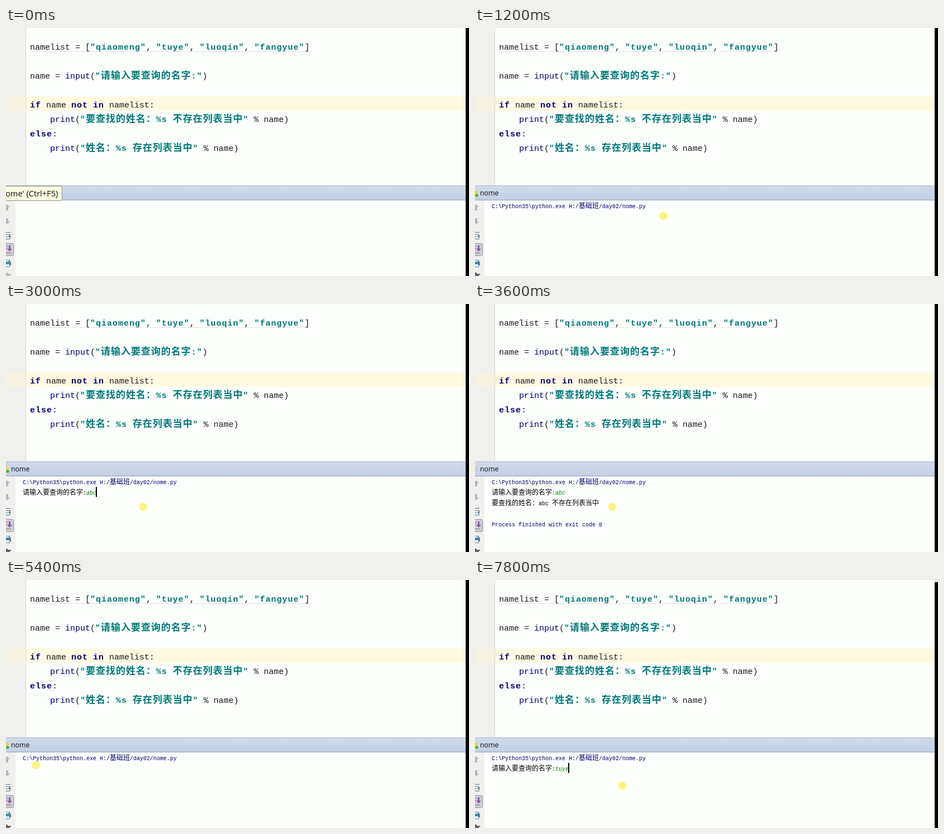
These frames come from a looping animation (830x446 px, 8000 ms). An HTML page:

```html
<!DOCTYPE html>
<html lang="zh-CN">
<head>
<meta charset="utf-8">
<title>Console run</title>
<style>
  html, body { margin: 0; width: 100%; height: 100%; overflow: hidden; background: #fcfefb; }
  svg { display: block; }
  text { white-space: pre; }
  .code text { font: 15px "Liberation Mono", monospace; fill: #1a1a1a; }
  .code .key, .code .str { font-weight: 700; letter-spacing: 1px; }
  .code .key, .code .builtin { fill: #000078; }
  .str { fill: #007a78; }
  .code .han { font: 700 17px "Noto Sans CJK SC", "Noto Sans CJK", "Noto Sans CJK JP", sans-serif; letter-spacing: 1px; }
  .console text { font: 10px "Liberation Mono", monospace; fill: #000; }
  .console .system { fill: #000070; }
  .console .han { font: 12px "Noto Sans CJK SC", "Noto Sans CJK", "Noto Sans CJK JP", sans-serif; }
  .console .typed { font-style: italic; fill: #007f00; }
  .label { font-family: "Open Sans", "Noto Sans", sans-serif; fill: #111; }
  #pointer { mix-blend-mode: multiply; }
</style>
</head>
<body>
<svg width="830" height="446" viewBox="0 0 830 446">
  <defs>
    <linearGradient id="bar" x2="0" y2="1">
      <stop stop-color="#d0daea"/>
      <stop offset="1" stop-color="#c3cfe3"/>
    </linearGradient>
  </defs>

  <!-- editor -->
  <rect width="830" height="446" fill="#fcfefb"/>
  <rect width="36" height="284" fill="#f0f0ee"/>
  <rect y="123" width="824" height="26" fill="#fff9e2"/>
  <rect y="123" width="36" height="26" fill="#f7f2e2"/>
  <rect x="35" width="1" height="284" fill="#d6d6ce"/>
  <path d="M43 42.5H543" stroke="#e2e4e2"/>
  <g class="code">
    <text x="43" y="39">namelist = [<tspan class="str">"qiaomeng"</tspan>, <tspan class="str">"tuye"</tspan>, <tspan class="str">"luoqin"</tspan>, <tspan class="str">"fangyue"</tspan>]</text>
    <text x="43" y="91">name = <tspan class="builtin">input</tspan>(<tspan class="str">"<tspan class="han">请输入要查询的名字</tspan>:"</tspan>)</text>
    <text x="43" y="143"><tspan class="key">if</tspan> name <tspan class="key">not</tspan> <tspan class="key">in</tspan> namelist:</text>
    <text x="43" y="169">    <tspan class="builtin">print</tspan>(<tspan class="str">"<tspan class="han">要查找的姓名：</tspan>%s <tspan class="han">不存在列表当中</tspan>"</tspan> % name)</text>
    <text x="43" y="195"><tspan class="key">else</tspan>:</text>
    <text x="43" y="221">    <tspan class="builtin">print</tspan>(<tspan class="str">"<tspan class="han">姓名：</tspan>%s <tspan class="han">存在列表当中</tspan>"</tspan> % name)</text>
  </g>

  <!-- tool window header -->
  <rect y="283" width="824" height="27" fill="url(#bar)"/>
  <path d="M0 283.5H824" stroke="#b4bcc8"/>
  <path d="M0 309.5H824" stroke="#98a2b2"/>
  <circle id="fileIcon" cx="-1" cy="296" r="5" fill="#f2cf3a"/>
  <circle id="runDot" cx="3" cy="301" r="2.5" fill="#35b62c"/>
  <text class="label" x="9" y="301" font-size="12.3">nome</text>

  <!-- console toolbar -->
  <rect y="310" width="17" height="136" fill="#f0f0ee"/>
  <g fill="#b4b8c2">
    <path d="M2 317L7 322H4V328H0V322H-3Z"/>
    <path d="M2 353L7 348H4V342H0V348H-3Z"/>
  </g>
  <path d="M0 367.5H8M0 371.5H7V375M0 375.5H3M0 379.5H8" fill="none" stroke="#5d7684" stroke-width="1.2"/>
  <path d="M4 375L8 372V378Z" fill="#3a7f9c"/>
  <rect x="-4" y="387.5" width="17.5" height="22" rx="2" fill="#cfccd4" stroke="#98969c"/>
  <path d="M0 392.5H3M0 396.5H2M0 404.5H9" stroke="#77727c" stroke-width="1.2"/>
  <path d="M5 391H8V397H11L6.5 402L2 397H5Z" fill="#8a5ca8"/>
  <path d="M0 417H7V420H9V427H7V430H0Z" fill="#5286a2"/>
  <path d="M0 419H5M0 426H5V428H0" fill="none" stroke="#f8fafa" stroke-width="2"/>
  <path id="trash" d="M0 440H3V442H9V444H7V446H0Z"/>

  <!-- console -->
  <g class="console">
    <text id="command" class="system" x="30" y="324">C:\Python35\python.exe H:/<tspan class="han">基础班</tspan>/day02/nome.py</text>
    <text id="prompt" x="30" y="343"><tspan class="han">请输入要查询的名字</tspan>:<tspan id="typed" class="typed"></tspan></text>
    <g id="result">
      <text x="30" y="362"><tspan class="han">要查找的姓名：</tspan>abc <tspan class="han">不存在列表当中</tspan></text>
      <text class="system" x="30" y="400">Process finished with exit code 0</text>
    </g>
    <rect id="caret" y="329" width="2" height="18"/>
  </g>

  <g id="tooltip">
    <rect x="-4" y="284.5" width="104.5" height="26" rx="2" fill="#fdfde0" stroke="#8c8c88"/>
    <text class="label" x="-1" y="303" font-size="14.6">ome' (Ctrl+F5)</text>
  </g>

  <circle id="pointer" r="7.2" fill="#fff47c"/>
  <rect x="824" width="6" height="446"/>
  <rect id="corner" x="824" width="6" height="4" fill="#eadbe2"/>
</svg>
<script>
  const LOOP = 8000, STEP = 200;
  const el = id => document.getElementById(id);
  const show = (id, on) => { el(id).style.visibility = on ? 'visible' : 'hidden'; };

  const runs = [
    { clear: 0, command: 1000, prompt: 1400, focus: 1800, input: 'abc', keys: [2200, 2400, 2600], done: 3400 },
    { clear: 5000, command: 5400, prompt: 5600, focus: 5800, input: 'tuye', keys: [6600, 6800, 7200, 7400], done: Infinity }
  ];

  // time, x, y
  const path = [
    [0, -40, 300], [600, -40, 300], [1200, 338, 338], [1800, 246, 365],
    [3800, 246, 365], [4600, 121, 396], [5000, -20, 320],
    [5200, -20, 320], [5800, 264, 370], [LOOP, 264, 370]
  ];

  function pointerAt(t) {
    const i = path.findIndex(p => p[0] > t);
    const [t0, x0, y0] = path[i - 1], [t1, x1, y1] = path[i];
    const k = (t - t0) / (t1 - t0), e = k * k * (3 - 2 * k);
    return [x0 + (x1 - x0) * e, y0 + (y1 - y0) * e];
  }

  function draw(now) {
    const t = Math.floor(now % LOOP / STEP) * STEP;
    const run = runs[t < runs[1].clear ? 0 : 1];
    const typed = run.input.slice(0, run.keys.filter(k => k <= t).length);
    const running = t < run.done;

    show('tooltip', t < 800);
    show('command', t >= run.command);
    show('prompt', t >= run.prompt);
    show('result', !running);
    show('caret', t >= run.focus && running);
    show('runDot', running);
    show('corner', t >= 7400);
    el('typed').textContent = typed;
    el('caret').setAttribute('x', 143 + 6 * typed.length);
    el('fileIcon').setAttribute('opacity', running ? 1 : 0.35);
    el('trash').setAttribute('fill', t >= run.command ? '#5e6470' : '#bcbec4');

    const [x, y] = pointerAt(t);
    el('pointer').setAttribute('cx', x);
    el('pointer').setAttribute('cy', y);
  }

  const start = performance.now();
  (function tick() {
    draw(performance.now() - start);
    requestAnimationFrame(tick);
  })();
</script>
</body>
</html>
```
